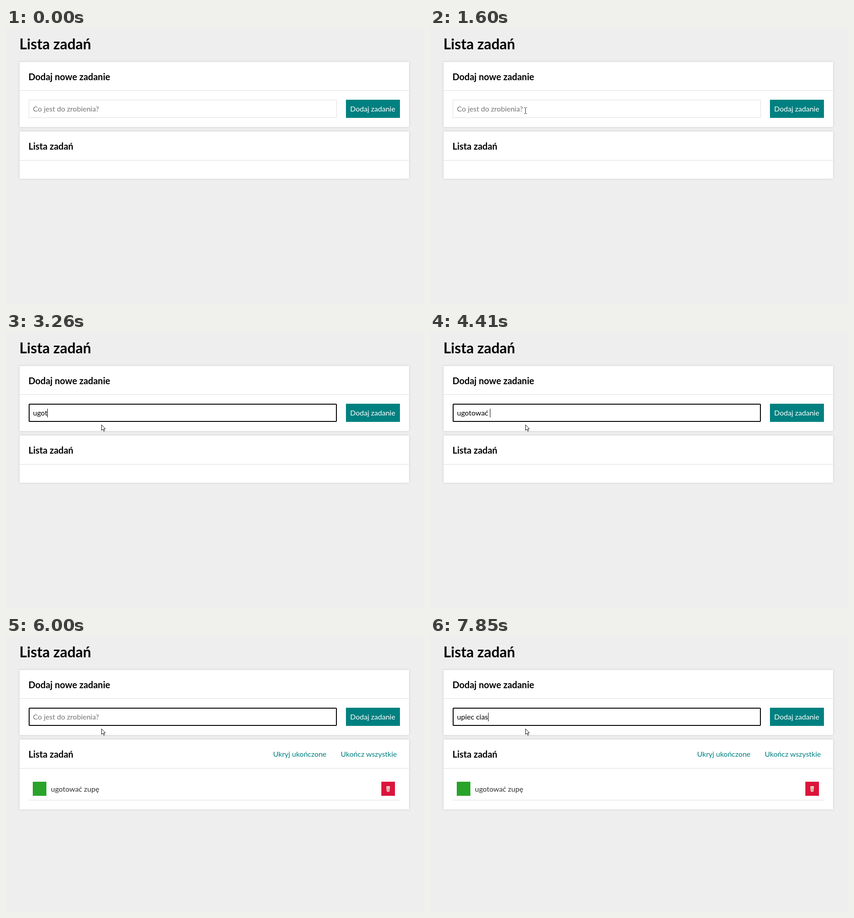
An HTML page that plays this animation: 921x608 px, repeating every 8000 ms.

```html
<!DOCTYPE html>
<html lang="pl">
<head>
<meta charset="utf-8">
<title>Lista zadań</title>
<style>
  html, body { margin: 0; width: 100%; height: 100%; overflow: hidden; background: #eee; }
  #stage { position: relative; width: 921px; height: 608px; overflow: hidden; background: #eee;
    font: 16px/20px Lato, sans-serif; color: #000; }
  #stage * { position: absolute; box-sizing: border-box; white-space: pre; margin: 0; }
  h1 { left: 29.5px; top: 15px; font: bold 32px/40px Lato, sans-serif; }
  .card { left: 29.5px; width: 858px; background: #fff; box-shadow: 0 0 5px #ccc; }
  .card h2 { left: 20px; top: 20px; font: bold 20px/24px Lato, sans-serif; }
  .card hr { left: 0; top: 62px; width: 100%; height: 1px; border: 0; background: #ddd; }
  #add { top: 75px; height: 143px; }
  #list { top: 228px; height: 104px; }
  #list hr { top: 63px; }
  #field { left: 49.5px; top: 158px; width: 679px; height: 40px; border: 1px solid #ddd; }
  #field.focus { border: 2px solid #000; border-radius: 2px; }
  #text { left: 59.5px; top: 168px; }
  #text.hint { color: #757575; }
  #caret { top: 169px; width: 1px; height: 19px; background: #000; }
  #button { left: 748.5px; top: 158px; width: 119px; height: 40px; background: teal; color: #fff;
    line-height: 40px; text-align: center; border-radius: 1px; }
  .link { top: 250px; color: teal; }
  #done { left: 59px; top: 321px; width: 30px; height: 31px; background: #29a329; }
  #task { left: 99px; top: 327px; color: #333; }
  #remove { left: 827px; top: 321px; width: 30px; height: 31px; background: crimson; }
  #rule { left: 49.5px; top: 361px; width: 818px; height: 1px; background: #ddd; }
  svg { left: 0; top: 0; overflow: visible; }
</style>
</head>
<body>
<div id="stage">
  <h1>Lista zadań</h1>
  <div class="card" id="add"><h2>Dodaj nowe zadanie</h2><hr></div>
  <div class="card" id="list"><h2>Lista zadań</h2><hr></div>
  <div id="field"></div>
  <span id="text"></span>
  <div id="caret"></div>
  <div id="button">Dodaj zadanie</div>
  <div id="items">
    <span class="link" style="left:588.5px">Ukryj ukończone</span>
    <span class="link" style="left:737.5px">Ukończ wszystkie</span>
    <div id="done"></div>
    <span id="task">ugotować zupę</span>
    <div id="remove">
      <svg width="30" height="31">
        <path d="M11 11.5L12 21.5Q15 23 18 21.5L19 11.5Z" fill="#f3dfd2"/>
        <path d="M13.2 13L13.8 21M15.2 13V21M17.2 13L16.7 21" stroke="#b86a62" stroke-width=".7"/>
        <ellipse cx="15" cy="11.2" rx="4.3" ry="1.5" fill="#fff3e8" stroke="#b98273" stroke-width=".6"/>
      </svg>
    </div>
    <div id="rule"></div>
  </div>
  <svg id="arrow" width="12" height="18">
    <path d="M.5 .5V12.7L3.3 10.1L5.3 14.7L7.3 13.8L5.3 9.4H9Z" fill="#fff" stroke="#111"/>
  </svg>
  <svg id="beam" width="8" height="15">
    <path d="M.5 .5H2.5L3.5 1.5L4.5 .5H6.5M3.5 1.5V12.5M.5 13.5H2.5L3.5 12.5L4.5 13.5H6.5" fill="none" stroke="#222"/>
  </svg>
</div>
<script>
const LOOP = 8000, FOCUS = 1740, SUBMIT = 6000;
const HINT = 'Co jest do zrobienia?';
const $ = id => document.getElementById(id);

// Each entry gives the key times of one typed phrase, letter by letter.
const phrases = [
  { from: 0, word: 'ugotować zupę',
    keys: [2410, 2670, 2930, 3260, 3390, 3660, 3860, 4190, 4410, 4680, 4810, 5010, 5340] },
  { from: SUBMIT, word: 'upiec cias',
    keys: [6400, 6660, 6860, 6930, 7130, 7260, 7400, 7530, 7650, 7850] }
];
const caretOff = [[0, FOCUS], [2210, 2410], [5930, 6400]];

// Pointer hot spot: time, x, y
const path = [
  [990, 847, 488], [1060, 742, 425], [1130, 615, 352], [1200, 490, 284], [1260, 385, 230],
  [1330, 305, 191], [1400, 254, 169], [1470, 228, 164], [1530, 215, 173], [1600, 210, 182],
  [1940, 215.5, 190], [2010, 210, 203], [2480, 210, 204]
];

const show = (id, on) => { $(id).style.visibility = on ? 'visible' : 'hidden'; };
const move = (id, x, y) => { $(id).style.transform = `translate(${x}px, ${y}px)`; };

function drawPointer(t) {
  const at = path.filter(p => p[0] <= t).pop();
  const [, x, y] = at || [0, 0, 0];
  const inField = x > 50 && x < 729 && y > 158 && y < 198;
  show('arrow', at && !inField);
  show('beam', at && inField);
  move('arrow', Math.round(x), y);
  move('beam', Math.round(x - 3), y - 7);
}

function drawField(t) {
  const { word, keys } = phrases.filter(p => p.from <= t).pop();
  const typed = word.slice(0, keys.filter(k => k <= t).length);
  const text = $('text');
  text.textContent = typed || HINT;
  text.className = typed ? '' : 'hint';
  $('field').className = t >= FOCUS ? 'focus' : '';
  const width = typed ? text.getBoundingClientRect().width : 0;
  $('caret').style.left = Math.floor(60 + width) + 'px';
  show('caret', !caretOff.some(([a, b]) => t >= a && t < b));
}

function draw(t) {
  drawField(t);
  drawPointer(t);
  const added = t >= SUBMIT;
  $('items').style.display = added ? 'block' : 'none';
  $('list').style.height = added ? '154px' : '104px';
}

const start = performance.now();
function tick() {
  draw((performance.now() - start) % LOOP);
  requestAnimationFrame(tick);
}
draw(0);
tick();
</script>
</body>
</html>
```
